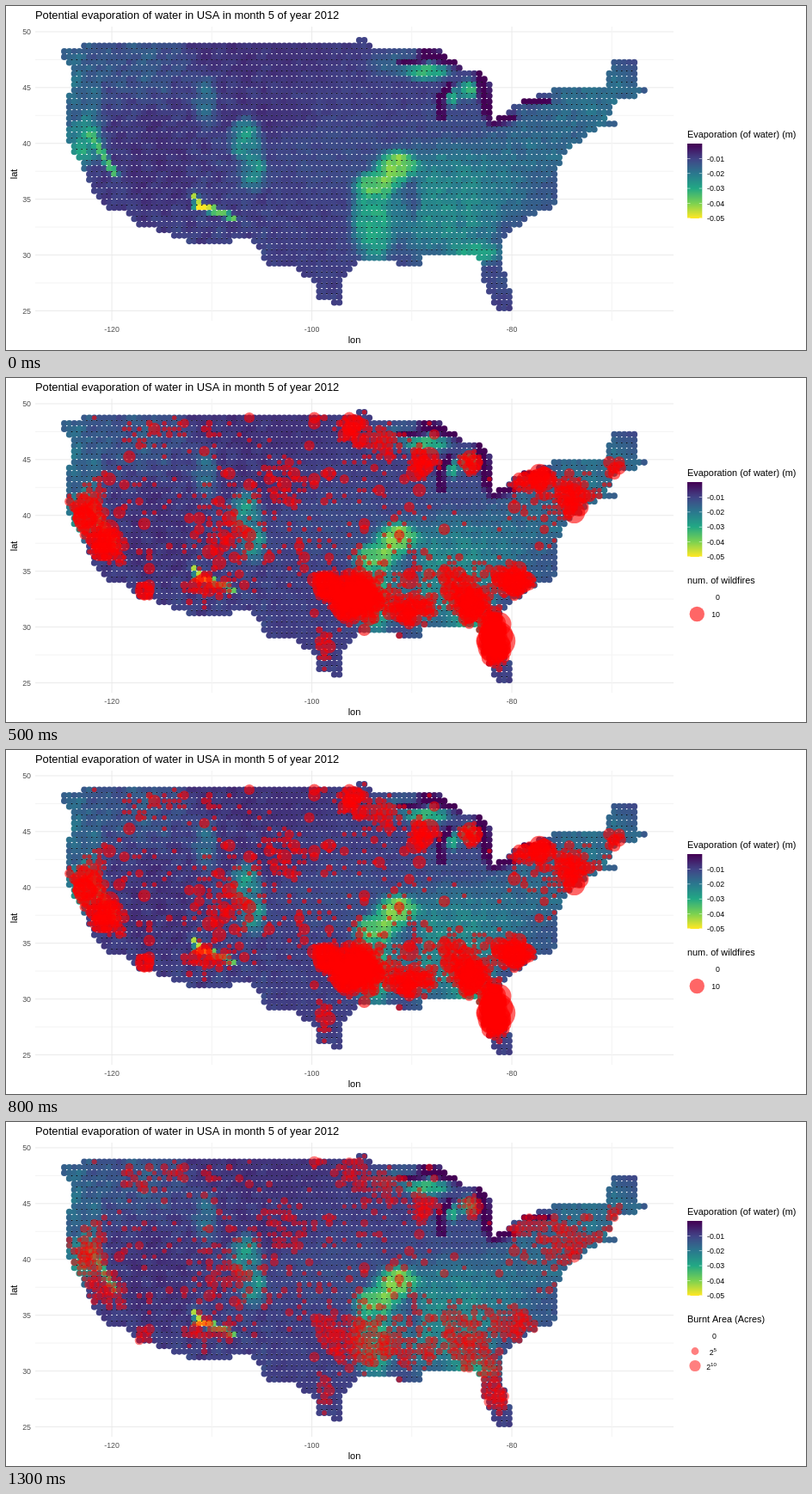
Animation, 930 px wide and 400 px high, one loop 1.5 s. Source, as an HTML page with a canvas:

```html
<!DOCTYPE html>
<html lang="en">
<head>
<meta charset="utf-8">
<title>Potential evaporation</title>
<style>
html, body { margin: 0; width: 930px; height: 400px; overflow: hidden; background: #fff; }
canvas { display: block; }
</style>
</head>
<body>
<canvas id="stage" width="930" height="400"></canvas>
<script>
const W = 930, H = 400, STEP = 500;
const COLS = 117, ROWS = 49, X0 = 67.8, Y0 = 39.7, DX = 5.812, DY = 6.49;
const FONT = '"Liberation Sans", Arial, sans-serif';
const COUNT_RED = 'rgba(255,0,0,.6)', AREA_RED = 'rgba(255,0,0,.5)';

// Key points of the coast in grid columns and rows, clockwise from the north-west
const COAST = new Path2D(`M-.5 1.6 L3.5 1.5 V.5 H58.5 V-.5 H60.5 L61.5 1.5 H74.5 L77.5 3.4 80.5 5.4
  83.5 5.5 85.5 8 V14.5 L91 11.4 98 8.6 H108.5 V6 L110 3.6 H114.5 V8.5 H116.5 V9.5 L110.5 11 108 14.5
  H110.5 V15.5 L106.5 16 101.5 19 98.4 23 V28.4 L97.3 30.5 94 31.2 88 35.2 87.3 39 89.4 46 V48.5
  H86.6 L83.6 43 V39.7 L81.7 38.5 H71.5 V40.5 H66.5 V39.5 H59.5 L55.5 43.4 V47.5 H53.6 L53 46.5
  H50.5 V44 L45.6 40.5 H40.6 L37.5 35.5 H33.5 V36.5 H26.5 L14 32.8 12.5 30.5 H8.6 L5 25.8 4 23
  1.5 20 V18.5 H.5 V10 L1.7 9.4 V6 L.5 3.5 H-.5 Z`);

// Soft regions of the value field: x, y, x radius, y radius, level
const REGIONS = [
  [270,60,120,40,.15], [175,180,45,65,.15], [300,130,60,25,.15], [400,175,80,40,.23],
  [88,90,28,55,.34], [160,65,50,45,.27], [232,108,14,30,.33], [470,68,45,16,.32],
  [620,185,75,65,.35], [690,110,70,45,.36], [515,230,65,70,.46], [520,130,45,22,.23],
  [640,215,28,25,.27], [575,320,30,22,.23], [90,158,20,28,.54], [278,155,18,22,.48],
  [288,192,14,22,.5], [428,250,24,48,.58], [430,208,22,14,.74], [455,187,22,18,.8],
  [472,222,9,24,.28], [548,287,26,12,.58], [490,77,24,9,.62], [538,98,11,11,.62], [520,107,6,10,.6]
];
// Ridges and lakes: x1, y1, x2, y2, half width, level
const RIDGES = [
  [99,150,127,196,4.5,.7], [218,220,224,228,4,.88], [223,233,240,237,4.5,1], [240,237,266,247,4,.75],
  [460,65,488,62,4,0], [486,55,530,67,7,0], [516,94,503,108,5,0], [504,105,507,130,5,0],
  [552,78,560,125,7,0], [566,134,590,130,6,0], [598,111,630,110,5,0]
];
// Fire clusters: x, y, x spread, y spread, amount
const FIRES = [
  [97,160,9,17,130], [118,192,9,9,100], [162,247,4,4,25], [404,58,8,9,50], [440,74,12,9,45],
  [482,102,10,8,65], [540,98,6,5,35], [612,119,14,5,80], [657,145,9,13,100], [708,105,4,4,12],
  [320,116,14,14,40], [255,178,20,24,75], [236,242,14,10,55], [372,242,8,7,90], [408,255,17,13,420],
  [470,270,12,7,80], [541,265,8,9,170], [525,238,9,9,50], [590,236,11,8,140], [569,302,7,14,330],
  [371,312,5,14,22], [180,62,40,10,40], [358,46,2,2,7], [480,245,60,26,130], [650,135,36,22,80],
  [270,150,110,55,150], [420,150,60,55,60]
];

const VIRIDIS = ['440154', '414487', '2a788e', '22a884', '7ad151', 'fde725']
  .map(h => [0, 2, 4].map(i => parseInt(h.slice(i, i + 2), 16)));

function seeded(seed) {
  return () => {
    seed = seed + 0x6D2B79F5 | 0;
    let t = Math.imul(seed ^ seed >>> 15, 1 | seed);
    t = t + Math.imul(t ^ t >>> 7, 61 | t) ^ t;
    return ((t ^ t >>> 14) >>> 0) / 4294967296;
  };
}

const px = c => X0 + c * DX;
const py = r => Y0 + r * DY;
const probe = document.createElement('canvas').getContext('2d');
const land = Array.from({ length: ROWS * COLS },
  (_, i) => probe.isPointInPath(COAST, i % COLS, Math.floor(i / COLS)));
const isLand = (c, r) => c >= 0 && c < COLS && r >= 0 && r < ROWS && land[r * COLS + c];

function viridis(t) {
  const p = Math.min(.9999, Math.max(0, t)) * 5, i = Math.floor(p), f = p - i;
  return `rgb(${VIRIDIS[i].map((a, k) => Math.round(a + (VIRIDIS[i + 1][k] - a) * f))})`;
}

function level(x, y, jitter) {
  let v = .19;
  for (const [rx, ry, w, h, to] of REGIONS) {
    const d = ((x - rx) / w) ** 2 + ((y - ry) / h) ** 2;
    v += (to - v) * Math.exp(-d * d * .8);
  }
  // Mountain texture is strongest in the west
  const rough = x < 310 ? .2 : .08;
  v *= 1 + rough * Math.sin(x * .19 + 2 * Math.sin(y * .09)) * Math.sin(y * .15 + x * .05) + (jitter - .5) * .16;
  for (const [x1, y1, x2, y2, w, to] of RIDGES) {
    const dx = x2 - x1, dy = y2 - y1;
    const k = Math.min(1, Math.max(0, ((x - x1) * dx + (y - y1) * dy) / (dx * dx + dy * dy)));
    const d = Math.hypot(x - x1 - k * dx, y - y1 - k * dy) / w;
    v += (to - v) * Math.exp(-(d ** 4));
  }
  return v;
}

function disc(g, x, y, r, color) {
  g.fillStyle = color;
  g.beginPath();
  g.arc(x, y, r, 0, 7);
  g.fill();
}

function box(g, x, y, w, h, color) {
  g.fillStyle = color;
  g.fillRect(x, y, w, h);
}

function label(g, text, x, y, size = 8.8, align = 'left', color = '#000') {
  g.font = `${size}px ${FONT}`;
  g.fillStyle = color;
  g.textAlign = align;
  g.fillText(text, x, y);
}

function drawAxes(g) {
  const shade = i => i % 2 ? '#f4f4f4' : '#ebebeb';
  for (let i = 0; i < 11; i++) box(g, 34, 29.4 + i * 32.45, 742, 1.07, shade(i));
  for (let i = 0; i < 6; i++) box(g, 122.5 + i * 116.25, 24, 1.07, 342, shade(i));
  for (let i = 0; i < 6; i++) label(g, 50 - i * 5, 29, 33 + i * 64.9, 8.8, 'right', '#4d4d4d');
  for (let i = 0; i < 3; i++) label(g, -120 + i * 20, 123 + i * 232.5, 379, 8.8, 'center', '#4d4d4d');
  label(g, 'Potential evaporation of water in USA in month 5 of year 2012', 34, 15, 12.9);
  label(g, 'lon', 405, 392, 11, 'center');
  g.save();
  g.translate(13, 195.5);
  g.rotate(-Math.PI / 2);
  label(g, 'lat', 0, 0, 11, 'center');
  g.restore();
}

function drawField(g) {
  const rnd = seeded(5);
  for (let r = 0; r < ROWS; r++)
    for (let c = 0; c < COLS; c++)
      if (isLand(c, r)) disc(g, px(c), py(r), 3.8, viridis(level(px(c), py(r), rnd())));
  // Gaps between four neighbouring points
  for (let r = 0; r < ROWS; r++)
    for (let c = 0; c < COLS; c++)
      if (isLand(c, r) && isLand(c + 1, r) && isLand(c, r + 1) && isLand(c + 1, r + 1))
        box(g, px(c + .5) - .75, Math.round(py(r + .5) - .5), 1.5, 1, r % 2 ? '#000' : '#fff');
}

// Number of fires in each grid cell
function countFires() {
  const rnd = seeded(11), counts = new Map();
  const bell = () => (rnd() + rnd() + rnd() - 1.5) * 2;
  for (const [x, y, sx, sy, n] of FIRES)
    for (let i = 0; i < n; i++) {
      const c = Math.round((x + bell() * sx - X0) / DX);
      const r = Math.round((y + bell() * sy - Y0) / DY);
      const burst = 1 + Math.floor(8 * rnd() ** 6);
      if (isLand(c, r)) counts.set(r * COLS + c, (counts.get(r * COLS + c) || 0) + burst);
    }
  return counts;
}

function drawFires(g, color, radius) {
  for (const [cell, n] of fires)
    disc(g, px(cell % COLS), py(Math.floor(cell / COLS)), radius(n), color);
}

function drawScale(g, top) {
  label(g, 'Evaporation (of water) (m)', 792, top - 7, 10.9);
  for (let i = 0; i < 87; i++) box(g, 792, Math.round(top) + i, 17.3, 1, viridis(i / 86));
  for (let i = 1; i < 6; i++) {
    const y = top + i * 17.25;
    box(g, 792, y - .25, 3.5, .5, '#fff');
    box(g, 805.8, y - .25, 3.5, .5, '#fff');
    label(g, `-0.0${i}`, 815, y + 3.3);
  }
}

function drawCounts(g) {
  drawFires(g, COUNT_RED, n => 2.75 * Math.sqrt(n));
  label(g, 'num. of wildfires', 792, 239, 10.9);
  label(g, '0', 830, 258, 8.8, 'right');
  label(g, '10', 830, 278, 8.8, 'right');
  disc(g, 803.3, 274.5, 8.7, COUNT_RED);
}

function drawAreas(g) {
  const rnd = seeded(23);
  drawFires(g, AREA_RED, n => 2.6 + rnd() ** 2 * Math.min(5, 2.5 + n / 4));
  label(g, 'Burnt Area (Acres)', 792, 233, 10.9);
  label(g, '0', 826, 252, 8.8, 'right');
  [['5', 270.5, 4.4], ['10', 287.5, 6.6]].forEach(([power, y, r]) => {
    label(g, power, 826, y - 3.5, 6.2, 'right');
    label(g, '2', 826 - power.length * 3.45, y, 8.8, 'right');
    disc(g, 801, y - 4, r, AREA_RED);
  });
}

function scene(scaleTop, overlay) {
  const c = document.createElement('canvas');
  c.width = W;
  c.height = H;
  const g = c.getContext('2d');
  box(g, 0, 0, W, H, '#fff');
  drawAxes(g);
  drawField(g);
  drawScale(g, scaleTop);
  if (overlay) overlay(g);
  return c;
}

const fires = countFires();
const scenes = [scene(160.3), scene(121.4, drawCounts), scene(115.3, drawAreas)];
const stage = document.getElementById('stage').getContext('2d');
const start = performance.now();

function tick() {
  const i = Math.floor((performance.now() - start) / STEP) % scenes.length;
  stage.drawImage(scenes[i], 0, 0);
  requestAnimationFrame(tick);
}
tick();
</script>
</body>
</html>
```
